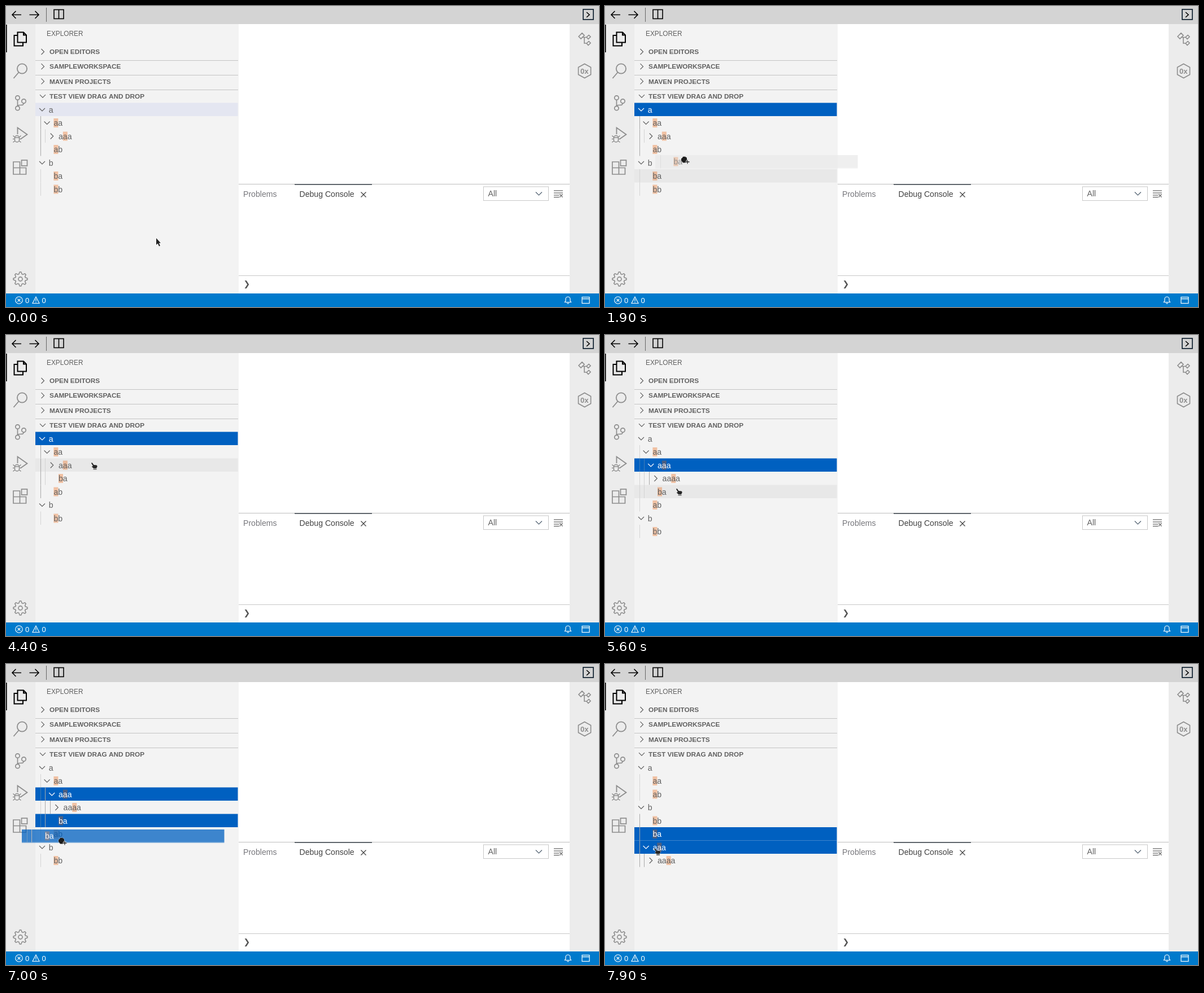
These frames come from a looping animation (1050 px wide and 533 px high, 8 s). An HTML page with a canvas:

```html
<!DOCTYPE html>
<html lang="en">
<head>
<meta charset="utf-8">
<title>Tree view drag and drop</title>
<style>
html, body { margin: 0; width: 100%; height: 100%; overflow: hidden; background: #fff; }
canvas { display: block; }
</style>
</head>
<body>
<canvas id="stage" width="1050" height="533"></canvas>
<script>
const LOOP = 8000, ROW = 23.5, TREE_TOP = 171.5, SIDE = 52, SIDE_W = 358.5;
const SANS = '"Liberation Sans", Arial, sans-serif';
const TEXT = '#616161', ICON = '#8d8d8d', BLUE = '#0060c0', HOVER = '#e8e8e8';
const stage = document.getElementById('stage').getContext('2d');
const ghost = document.createElement('canvas');
ghost.width = 412;
ghost.height = 24;
const ghostCtx = ghost.getContext('2d');
let g = stage;

// ---------- drawing helpers ----------
function box(x, y, w, h, color) {
  g.fillStyle = color;
  g.fillRect(x, y, w, h);
}
function frame(x, y, w, h, color, width = 1) {
  g.strokeStyle = color;
  g.lineWidth = width;
  g.strokeRect(x, y, w, h);
}
function line(path, color, width = 1.2) {
  g.strokeStyle = color;
  g.lineWidth = width;
  g.stroke(new Path2D(path));
}
function shape(path, fill, outline, width = 1) {
  const p = new Path2D(path);
  if (outline) {
    g.strokeStyle = outline;
    g.lineWidth = width;
    g.stroke(p);
  }
  g.fillStyle = fill;
  g.fill(p);
}
function ring(x, y, r, color, width = 1.5) {
  g.beginPath();
  g.arc(x, y, r, 0, 7);
  g.strokeStyle = color;
  g.lineWidth = width;
  g.stroke();
}
function text(s, x, y, color, size = 14.1, weight = 'normal', family = SANS) {
  g.font = `${weight} ${size}px ${family}`;
  g.fillStyle = color;
  g.fillText(s, x, y);
}
function chevron(x, y, open, color) {
  line(open ? `M${x - 5} ${y - 2.5}l5 5l5 -5` : `M${x - 2.5} ${y - 5}l5 5l-5 5`, color);
}

// ---------- window around the tree ----------
function drawTopBar() {
  box(0, 0, 1050, 32, '#d4d4d4');
  line('M17.5 9L11 15.5l6.5 6.5M11 15.5H27', '#000', 1.6);
  line('M51.5 9L58 15.5l-6.5 6.5M58 15.5H41.5', '#000', 1.6);
  box(71, 3, 1, 25, '#666');
  frame(85, 6.5, 17, 16, '#000', 1.6);
  line('M93.5 6V23', '#000', 1.6);
  frame(1022, 6, 18, 18, '#10202f', 1.7);
  line('M1028 11l5 4.5l-5 4.5', '#000', 1.6);
}

function drawActivityBars() {
  box(0, 32, SIDE, 477, '#ececec');
  box(998, 32, 52, 477, '#ececec');
  box(0, 33, 1.6, 49, '#000');
  line('M20.5 46.5H31l5 5V64.5H20.5ZM31 46.5v5h5M20.5 52H14.5V70.5H30V65', '#000', 2);

  ring(28.5, 111, 8.6, ICON, 1.8);
  line('M22.5 117.5L13.5 128', ICON, 1.8);

  ring(20.5, 162.5, 3.7, ICON, 1.7);
  ring(31.5, 168.5, 3.7, ICON, 1.7);
  ring(20.5, 181, 3.7, ICON, 1.7);
  line('M20.5 166V177.5M31.5 172C31.5 176 28 175.5 24 175.5C21.5 175.5 20.5 176 20.5 178', ICON, 1.7);

  line('M20.5 227V215.5L37.5 227.5L26 235.5', ICON, 1.8);
  line('M15.5 233.5a4 4 0 0 1 8 0v3.5a4 4 0 0 1 -8 0ZM15.5 233h8M12.5 229.5l3 3M26.5 229.5l-3 3' +
    'M12 235.5h3.5M23.5 235.5H27M12.5 241.5l3.5 -3M26.5 241.5l-3.5 -3', ICON, 1.4);

  line('M24.5 286.5V276H13V298H35.5V286.5H13M24.5 286.5V298', ICON, 1.7);
  frame(27.5, 273, 10, 10, ICON, 1.7);

  g.beginPath();
  for (let i = 0; i < 32; i++) {
    const r = i % 4 < 2 ? 12.5 : 9.2;
    const a = (i - 0.5) * Math.PI / 16;
    g.lineTo(25.5 + r * Math.cos(a), 483.5 + r * Math.sin(a));
  }
  g.closePath();
  g.strokeStyle = ICON;
  g.lineWidth = 1.6;
  g.stroke();
  ring(25.5, 483.5, 3.6, ICON, 1.6);

  line('M1014 54l6 -6l4 4l-6 6ZM1021 55.5H1028M1024 55.5V66H1028' +
    'M1028 55l4 -3.5l3 3l-4 4ZM1028 66l4 -3.5l3 3l-4 4Z', ICON, 1.6);
  line('M1024.5 102.5L1035.5 108.5V121.5L1024.5 127.5L1013.5 121.5V108.5Z', ICON, 1.6);
  text('0x', 1017, 119.5, ICON, 13, 'bold');
}

function drawSidebar() {
  box(SIDE, 32, 360, 477, '#f3f3f3');
  text('EXPLORER', 72, 53, TEXT, 11.85);
  ['OPEN EDITORS', 'SAMPLEWORKSPACE', 'MAVEN PROJECTS', 'TEST VIEW DRAG AND DROP'].forEach((title, i) => {
    const y = 81 + 26.2 * i;
    if (i) box(SIDE, Math.round(y - 11.5), 359, 1, '#c4c4c4');
    chevron(65, y, i === 3, TEXT);
    text(title, 77, y + 4.2, TEXT, 11.82, 'bold');
  });
}

function drawPanel() {
  box(412, 32, 586, 477, '#fff');
  box(412, 315, 586, 1, '#bdbdbd');
  box(511, 315, 137, 2, '#60666c');
  text('Problems', 420, 338, '#77777c');
  text('Debug Console', 519.5, 338, '#424242');
  line('M628.5 329.5l9 9M637.5 329.5l-9 9', '#424242', 1.3);
  frame(845.5, 320, 115, 24.5, '#c8c8c8');
  text('All', 853.5, 336.5, TEXT);
  line('M938 329.5l5.5 5.5l5.5 -5.5', '#506070');
  line('M970 327H986M970 331H986M970 335H979.5M970 338.5H979.5M980.5 333.5l5 5M985.5 333.5l-5 5', '#424242', 1.1);
  box(412, 477, 586, 1, '#c8c8c8');
  text('❯', 420.5, 497, '#555', 14, 'normal', '"DejaVu Sans", sans-serif');
}

function drawStatusBar() {
  box(0, 509, 1050, 24, '#007acc');
  ring(23, 521, 6.2, '#fff', 1.1);
  line('M20.5 518.5l5 5M25.5 518.5l-5 5', '#fff', 1.1);
  text('0', 34, 525.5, '#fff', 13);
  line('M53 515L59 526.5H47ZM53 518.5V523M53 524v1.2', '#fff', 1.1);
  text('0', 63.5, 525.5, '#fff', 13);
  line('M989.5 524.5H1000.5L999 522V519a4 4 0 0 0 -8 0V522ZM993.5 525.5a1.5 1.5 0 0 0 3 0', '#fff', 1.2);
  frame(1020, 515.5, 13, 11, '#fff', 1.2);
  line('M1020 518.5H1033', '#fff', 1.4);
}

// ---------- tree: "+" open, "-" closed, leading dots give the depth ----------
const parseTree = spec => spec.split(' ').map(item => {
  const [, dots, mark, label] = item.match(/^(\.*)([+-]?)(\w+)$/);
  return { label, depth: dots.length, mark };
});
const TREES = [
  [0, '+a .+aa ..-aaa .ab +b .ba .bb'],
  [3200, '+a .+aa ..-aaa ..ba .ab +b .bb'],
  [4800, '+a .+aa ..+aaa ...-aaaa ..ba .ab +b .bb'],
  [7900, '+a .aa .ab +b .bb .ba .+aaa ..-aaaa']
].map(([t, spec]) => [t, parseTree(spec)]);
const SELECTIONS = [[0, ['a']], [4700, ['aaa']], [6200, ['aaa', 'ba']]];
const FOCUS_TIME = 1500;
const DRAGS = [
  { from: 1600, to: 3100, x: 103, y: 296, row: 5 },
  { from: 6300, to: 7800, x: 122, y: 284.5, row: 4 }
];
const at = (steps, t) => steps.filter(s => s[0] <= t).pop()[1];

function ancestor(tree, i, depth) {
  while (i >= 0 && tree[i].depth > depth) i--;
  return tree[i];
}
function activeGuides(tree, selected) {
  return tree.flatMap((node, i) => {
    if (!selected.includes(node.label)) return [];
    return node.mark === '+' ? node : ancestor(tree, i, node.depth - 1);
  });
}

function drawRow(view, i, top) {
  const node = view.tree[i], indent = node.depth * 8.6, mid = top + 12;
  const selected = view.selected.includes(node.label);
  const bright = selected && view.focused;
  const color = bright ? '#fff' : TEXT;
  if (selected) box(SIDE, top, SIDE_W, ROW, bright ? BLUE : '#e4e6f1');
  else if (i === view.hover) box(SIDE, top, SIDE_W, ROW, HOVER);
  for (let d = 0; d < node.depth; d++) {
    const active = view.guides.includes(ancestor(view.tree, i, d));
    const guide = active ? '#a9a9a9' : bright ? 'rgba(169,169,169,.4)' : '#d4d4d4';
    box(Math.round(60.7 + d * 8.6), top, 1, ROW, guide);
  }
  if (node.mark) chevron(64 + indent, mid, node.mark === '+', color);
  const x = 75.8 + indent, marked = node.label.length - 2;
  if (marked >= 0) box(x + marked * 7.84, mid - 8, 8, 16, 'rgba(234,92,0,.33)');
  text(node.label, x, mid + 5, color);
}

function drawGhost(view, drag, pos) {
  const node = view.tree[drag.row];
  g = ghostCtx;
  g.clearRect(0, 0, 412, 24);
  drawRow(view, drag.row, 0);
  g = stage;
  g.globalAlpha = view.selected.includes(node.label) ? 0.75 : 0.7;
  g.drawImage(ghost, pos.x - drag.x, TREE_TOP + drag.row * ROW + pos.y - drag.y);
  g.globalAlpha = 1;
}

// ---------- pointer ----------
const PATH = [
  [100, 266, 411], [300, 250, 400], [500, 190, 362], [700, 115, 318], [900, 86, 300],
  [1000, 97, 298], [1200, 103, 296], [1500, 103, 296], [1700, 122, 288], [1900, 140, 270.5],
  [2000, 142, 260], [2300, 140.5, 221.5], [2400, 139, 210], [2600, 139, 210], [2700, 136.5, 205],
  [3800, 136.5, 205], [4100, 150, 225], [4200, 151, 227], [4300, 151, 227], [4400, 150.5, 225.5],
  [4700, 150.5, 225.5], [5000, 130, 259], [5100, 130, 259], [5200, 135, 262], [5500, 135, 262],
  [5600, 125.5, 271.5], [5700, 114, 287.5], [5800, 114, 287.5], [6000, 119, 284], [6100, 119, 284],
  [6200, 122, 284.5], [6300, 121, 285.5], [7000, 98, 311.5], [7300, 87, 326]
];
function pointerAt(t) {
  const n = PATH.findIndex(p => p[0] > t);
  const b = PATH[n < 0 ? PATH.length - 1 : n];
  const a = n > 0 ? PATH[n - 1] : b;
  const k = a === b ? 0 : (t - a[0]) / (b[0] - a[0]);
  return { x: a[1] + (b[1] - a[1]) * k, y: a[2] + (b[2] - a[2]) * k };
}

function drawPointer(pos, dragging, overRows) {
  g.save();
  g.lineJoin = 'round';
  if (dragging) {
    g.translate(pos.x - 6, pos.y - 4.5);
    shape('M1 5Q1 3 3 3L3.5 1.5Q5 0 6 1Q8 0 8.5 1.5Q11 1 11 4V8L9.5 11.5H4L1 7.5Z', '#1c1c1c', 'rgba(255,255,255,.6)', 1);
    line('M12 6.5v7M8.5 10h7', '#fff', 3);
    line('M12 6.5v7M8.5 10h7', '#222', 1.3);
  } else if (overRows) {
    g.translate(pos.x, pos.y);
    shape('M0.5 1.5Q1 0 2.5 1L5 4.5L10 5Q11.5 6 11 8L9.5 10.5H4.5L1 7.5L3.5 6.5Z', '#252525', 'rgba(255,255,255,.7)', 1);
    line('M4 12H10', '#555', 1.6);
  } else {
    g.translate(pos.x, pos.y);
    shape('M0 0V12L2.8 9.5L5 14.5L7 13.6L4.8 8.8H8Z', '#222', '#fff', 1.4);
  }
  g.restore();
}

// ---------- timeline ----------
function hoverRow(t, pos, rows) {
  if (t >= 1500 && t < 3900) return 5;
  if (t >= 6200) return -1;
  const row = Math.floor((pos.y - TREE_TOP) / ROW);
  return row < rows ? row : -1;
}

function draw(time) {
  const t = Math.floor(time / 100) * 100;
  const tree = at(TREES, t), selected = at(SELECTIONS, t);
  const pos = pointerAt(t);
  const drag = DRAGS.find(d => t >= d.from && t < d.to);
  const view = {
    tree, selected,
    focused: t >= FOCUS_TIME,
    guides: activeGuides(tree, selected),
    hover: hoverRow(t, pos, tree.length)
  };
  drawSidebar();
  drawPanel();
  drawActivityBars();
  drawTopBar();
  drawStatusBar();
  tree.forEach((_, i) => drawRow(view, i, TREE_TOP + i * ROW));
  if (drag) drawGhost(view, drag, pos);
  drawPointer(pos, drag, pos.y < TREE_TOP + tree.length * ROW);
}

const start = performance.now();
function tick() {
  draw((performance.now() - start) % LOOP);
  requestAnimationFrame(tick);
}
tick();
</script>
</body>
</html>
```
